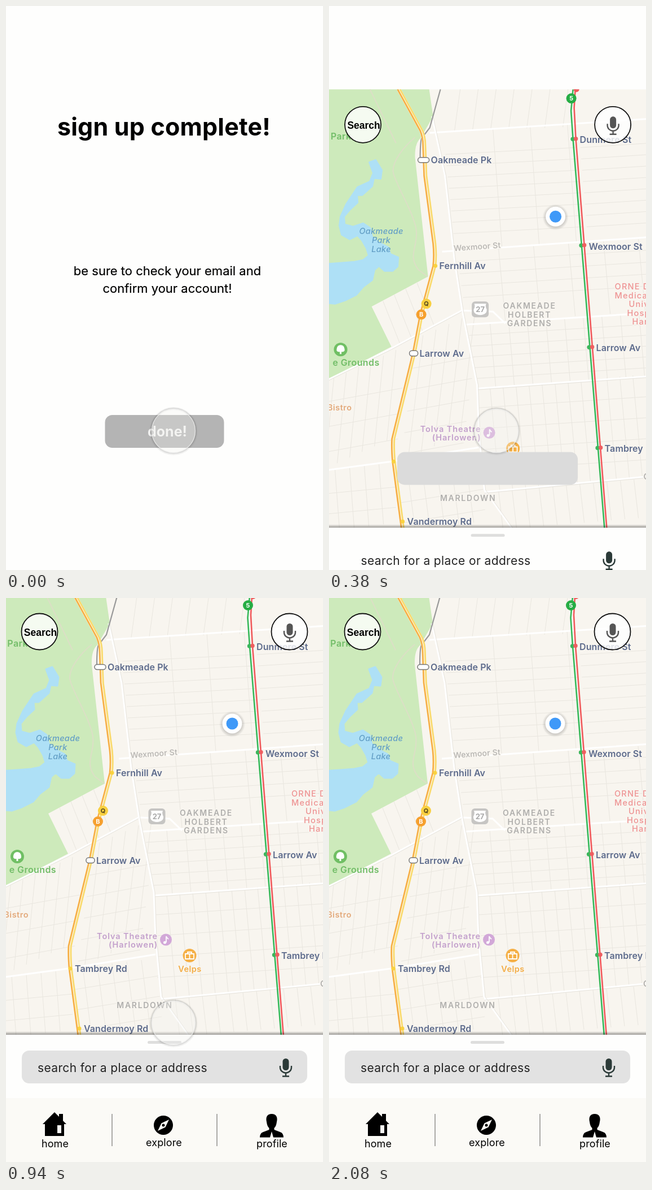
An HTML page that plays this animation: 562 px wide and 997 px high, repeating every 2.1 s.

```html
<!DOCTYPE html>
<html lang="en">
<head>
<meta charset="utf-8">
<title>Sign up to map</title>
<style>
html, body { margin: 0; width: 100%; height: 100%; overflow: hidden; background: #fefefd; }
svg { display: block; width: 562px; height: 997px; font-family: Inter, Roboto, sans-serif; }
.mid { text-anchor: middle; }
.end { text-anchor: end; }
.title { font-weight: 700; font-size: 43px; letter-spacing: .2px; }
.body { font-weight: 400; font-size: 22px; stroke: #000; stroke-width: .2px; }
.done { font-weight: 700; font-size: 25px; fill: #f3f3f2; }
.field { font-size: 21px; letter-spacing: .37px; fill: #222; }
.tab { font-size: 18px; letter-spacing: .1px; }
.search { font: 700 17.5px "Liberation Sans", Arial, sans-serif; }
#labels text { font-weight: 600; font-size: 14.5px; paint-order: stroke; stroke: #f8f5ef; stroke-width: 3px; stroke-linejoin: round; }
#labels .stop { font-size: 16px; letter-spacing: .1px; fill: #5d6b8c; }
#labels .street { font-size: 14px; font-weight: 500; fill: #b5b3b0; letter-spacing: .2px; }
#labels .area { font-size: 14px; fill: #b0afad; letter-spacing: 1.7px; }
#labels .clinic { font-weight: 500; fill: #ee9393; letter-spacing: 1.2px; }
#labels .stage { fill: #c3a0cc; letter-spacing: .9px; }
#labels .shop { fill: #f3ad47; letter-spacing: .5px; }
#labels .food { fill: #e3aa7c; letter-spacing: .5px; }
#labels .park { font-size: 16px; fill: #72bd68; stroke: none; letter-spacing: .4px; }
#labels .lake { font-style: italic; font-weight: 500; fill: #639fc6; stroke: none; letter-spacing: .3px; }
.bullet { font-size: 11px; font-weight: 700; text-anchor: middle; }
</style>
</head>
<body>
<svg viewBox="0 0 562 997" xmlns="http://www.w3.org/2000/svg">
  <defs>
    <linearGradient id="edge" x2="0" y2="1">
      <stop offset="0" stop-opacity="0"/><stop offset="1" stop-opacity=".38"/>
    </linearGradient>
    <radialGradient id="halo">
      <stop offset=".7" stop-opacity=".2"/><stop offset="1" stop-opacity="0"/>
    </radialGradient>
    <clipPath id="page"><rect x="-10" y="-3" width="590" height="1010"/></clipPath>
    <g id="mic">
      <rect x="-5.5" y="-16" width="11" height="21" rx="5.5" fill="currentColor"/>
      <path d="M-10-3V0A10 9.5 0 0 0 10 0V-3M0 10V15M-6 15.5H6" fill="none" stroke="currentColor" stroke-width="2.4"/>
    </g>
    <path id="line" d="M123-3L163 70Q168 82 168 95L170 150L186 270Q188 290 186 309L163 395L150 463L113 615Q112 630 114 655L130 775"/>
  </defs>

  <rect width="562" height="997" fill="#fefefd"/>
  <g class="intro">
    <text class="title mid" x="280" y="229">sign up complete!</text>
    <text class="body mid" x="286" y="476">be sure to check your email and</text>
    <text class="body mid" x="286" y="507">confirm your account!</text>
  </g>

  <g class="sheet" clip-path="url(#page)">
    <rect x="-10" y="-3" width="580" height="780" fill="#f8f5ef"/>
    <path fill="#cdeabb" d="M-10-3H177L184 45L162 83Q151 92 152 118L175 328L75 381L110 452L-10 514Z"/>
    <path fill="none" stroke="#dcdfc6" stroke-width="2" d="M72-3L118 92M152 82C130 100 112 125 113 142S150 215 154 245S138 290 158 316L174 328"/>
    <path fill="#aee0f6" stroke="#aee0f6" stroke-width="3" stroke-linejoin="round" d="M71 126L82 122L93 140L91 155L79 154L76 168L58 184L49 184L50 197L36 210L26 222L27 236L42 240L60 234L72 242L76 258L88 268L104 276L108 288L122 294L121 310L112 318L98 318L88 309L80 316L76 334L60 346L48 360L28 370L10 376L-10 374V306L20 304L45 302L60 299L70 291L66 278L58 264L50 255L36 262L22 254L18 238L20 222L30 200L42 182L50 170L72 160L78 145Z"/>
    <path id="lanes" fill="none" stroke="#e9e6df"/>
    <g fill="none" stroke="#fff" stroke-width="3">
      <path d="M182 45L205 150L222 300L236 390L262 520L265 600L275 705L325 775"/>
      <path d="M-10 514L110 455L235 388L290 390L312 411M240 413L570 392"/>
      <path d="M178 74L570 49M200 284L570 258M262 526L570 504M-10 671L110 655L265 630M275 709L570 681"/>
    </g>
    <path fill="none" stroke="#e6e3dc" d="M184 45L207 150L224 300L238 390L264 520L267 600L277 705L327 775M-10 516L110 457L235 390M264 528L570 506M275 711L570 683"/>
    <path fill="none" stroke="#999" stroke-width="2.2" d="M197-3L178 65L164 83Q161 88 161 120"/>
    <use href="#line" fill="none" stroke="#fdf1cd" stroke-width="7"/>
    <use href="#line" fill="none" stroke="#f9da6c" stroke-width="2.6" x="2.4"/>
    <use href="#line" fill="none" stroke="#f6ad45" stroke-width="2.6" x="-2"/>
    <g fill="none" stroke-width="2.6">
      <path stroke="#f1595b" d="M436-3L434 30L437 85L492 775"/>
      <path stroke="#35b95a" d="M432-3L428.500 35L432 85L488 775"/>
    </g>
    <circle cx="438" cy="-3" r="5" fill="#ee5a5c"/>
    <g id="stops"></g>
    <g fill="#fff" stroke="#777" stroke-width="1.5">
      <rect x="157" y="117.500" width="20" height="9" rx="4.500"/>
      <rect x="142" y="459" width="15" height="9.500" rx="4.500"/>
    </g>
    <g fill="#f9d240"><circle cx="188" cy="309" r="3.500"/><circle cx="114" cy="655" r="3.500"/><circle cx="130" cy="761" r="3.500"/></g>

    <rect x="252.500" y="372" width="30" height="28" rx="6" fill="#c6c5c3"/>
    <path d="M257 376H278Q276 381 279 386Q280 395 267.500 396Q255 395 256 386Q259 381 257 376Z" fill="#fff"/>
    <text class="bullet" x="267.500" y="391" style="font-size:13px" fill="#aaa">27</text>
    <g id="labels"></g>
    <g class="bullet">
      <circle cx="172" cy="376" r="9" fill="#f9d040"/><text x="172" y="380" fill="#554820">Q</text>
      <circle cx="163" cy="395" r="9" fill="#f6a02f"/><text x="163" y="399" fill="#fff">B</text>
      <circle cx="429" cy="13" r="9" fill="#26ad44"/><text x="429" y="17" fill="#fff">5</text>
    </g>
    <circle cx="20" cy="457" r="12" fill="#70bf64"/>
    <path d="M18.500 465V461Q12 462 13 456Q14 449 20 449Q26 449 27 456Q28 462 21.500 461V465Z" fill="#fff"/>
    <circle cx="283.500" cy="604" r="10.500" fill="#d2a8d8"/>
    <path d="M284 609V598Q285 601 288 603" fill="none" stroke="#fff" stroke-width="1.800"/><circle cx="281.500" cy="609" r="2.500" fill="#fff"/>
    <circle cx="325.500" cy="632" r="12" fill="#f5b047"/>
    <path d="M318 629H333V638H318ZM322 629V626H329V629M325.500 629V638" fill="none" stroke="#fff" stroke-width="1.800"/>
    <circle cx="401" cy="223" r="23" fill="url(#halo)"/>
    <circle cx="401" cy="222" r="17.500" fill="#fff"/>
    <circle cx="401" cy="222" r="10.500" fill="#3f99f8"/>

    <g fill="#fff" fill-opacity=".8" stroke="#111" stroke-width="1.800">
      <circle cx="59.500" cy="59.500" r="32"/><circle cx="502.500" cy="59.500" r="32"/>
    </g>
    <text class="search mid" x="61" y="66.500">Search</text>
    <use href="#mic" x="503" y="61" color="#555"/>

    <rect x="-10" y="766" width="580" height="6" fill="url(#edge)"/>
    <rect x="-10" y="772" width="580" height="230" fill="#fefefd"/>
    <rect x="251" y="783" width="60" height="5" rx="2.500" fill="#dededd"/>
    <rect x="-10" y="884" width="580" height="120" fill="#fbfaf6"/>
    <path d="M188 912V969M374 912V969" stroke="#aaa9a7" stroke-width="2"/>
    <path d="M65 930L86 909L94 917V912H101V924L107 930H103V951H69V930Z"/>
    <rect x="91" y="932" width="7" height="14" fill="#fbfaf6"/>
    <circle cx="279" cy="932" r="17"/>
    <path d="M289 922L282.500 935.500L269 942L275.500 928.500Z" fill="#fbfaf6"/><circle cx="279" cy="932" r="2.500"/>
    <path d="M471 912C479 912 482 918 480 926Q479 934 475.500 937V940L486 944Q492 946 492 953.500H474L471 943L468 953.500H450Q450 946 456 944L466.500 940V937Q463 934 462 926C460 918 463 912 471 912Z"/>
    <g class="tab mid">
      <text x="87" y="971">home</text><text x="280" y="969">explore</text><text x="471.500" y="971">profile</text>
    </g>
  </g>

  <rect id="box" height="58" rx="13"/>
  <text class="done mid intro" x="286" y="761">done!</text>
  <g class="sheet">
    <text class="field" x="56" y="838">search for a place or address</text>
    <use href="#mic" x="496" y="830" color="#2b3a38"/>
  </g>

  <g id="touch" fill="none" stroke="#000">
    <circle cx="297" cy="751.500" r="40" stroke-opacity=".05" stroke-width="5"/>
    <circle cx="297" cy="751" r="39.500" stroke-opacity=".1" stroke-width="2.500"/>
    <circle cx="297" cy="751" r="38.500" fill="#f0f0ef" fill-opacity=".3" stroke="#f4f4f3" stroke-opacity=".75" stroke-width="1.500"/>
  </g>
</svg>

<script>
const LOOP = 2100;
const $ = id => document.getElementById(id);

// n parallel lines, each shifted by (dx, dy)
const hatch = (x1, y1, x2, y2, dx, dy, n) =>
  Array.from({ length: n }, (_, i) =>
    `M${x1 + dx * i} ${y1 + dy * i}L${x2 + dx * i} ${y2 + dy * i}`).join("");

$("lanes").setAttribute("d", [
  [206, 112, 436, 100, 2, 20, 8], [445, 100, 570, 92, 1.6, 20, 8],
  [222, 70, 232, -3, 32, -1, 7], [290, 66, 306, 275, 66, -4, 3],
  [228, 302, 570, 281, 3, 21, 4], [300, 278, 312, 406, 62, -4, 5],
  [248, 432, 570, 412, 3.5, 19, 5], [285, 411, 295, 523, 33, -2.2, 9],
  [265, 560, 570, 540, 1, 37, 4], [285, 525, 302, 706, 23, -2, 12],
  [300, 707, 308, 775, 24, -2, 11],
  [8, 508, -8, 668, 22, -10, 6], [166, 432, 140, 648, 23, -10, 5],
  [148, 490, 258, 470, -5, 38, 5], [-8, 550, 130, 525, -4, 45, 3],
  [10, 669, 18, 775, 26, -3, 4], [136, 652, 152, 775, 26, -3, 5],
  [-8, 712, 118, 700, 0, 36, 2], [122, 692, 270, 668, 3, 36, 3],
  [95, 371, 125, 446, 20, -11, 4]
].map(h => hatch(...h)).join(""));

$("stops").innerHTML = [[434.5, 85], [449.5, 273], [463.5, 453], [478.5, 631]].map(([x, y]) =>
  `<circle cx="${x - 3}" cy="${y}" r="3.7" fill="#3cb65c"/><circle cx="${x + 2.5}" cy="${y - .5}" r="3.7" fill="#ee5f61"/>`).join("");

$("labels").innerHTML = [
  ["stop", 180, 128, "Oakmeade Pk"], ["stop", 195, 315, "Fernhill Av"],
  ["stop", 160, 470, "Larrow Av"], ["stop", 122, 661, "Tambrey Rd"],
  ["stop", 138, 767, "Vandermoy Rd"], ["stop", 444, 92, "Dunmere St"],
  ["stop", 460, 281, "Wexmoor St"], ["stop", 473, 460, "Larrow Av"],
  ["stop", 488, 638, "Tambrey R"],
  ["lake mid", 92, 253, "Oakmeade"], ["lake mid", 92, 269, "Park"], ["lake mid", 92, 285, "Lake"],
  ["area mid", 355, 385, "OAKMEADE"], ["area mid", 355, 400.5, "HOLBERT"], ["area mid", 355, 416, "GARDENS"],
  ["area mid", 246, 725, "MARLDOWN"],
  ["clinic", 506, 351, "ORNE D"], ["clinic", 506, 367, "Medica"], ["clinic", 531, 382, "Univ"],
  ["clinic", 528, 398, "Hosp"], ["clinic", 537, 413, "Har"],
  ["stage end", 269, 603, "Tolva Theatre"], ["stage end", 269, 618, "(Harlowen)"],
  ["shop mid", 326, 661, "Velps"], ["food end", 40, 565, "Bistro"],
  ["park end", 39, 86, "Park"], ["park end", 89, 486, "e Grounds"],
  ["area", 557, 687, "C"]
].map(([c, x, y, s]) => `<text class="${c}" x="${x}" y="${y}">${s}</text>`).join("") +
  `<text class="street" transform="translate(221 283) rotate(-4)">Wexmoor St</text>`;

const clamp = v => Math.min(1, Math.max(0, v));
const span = (t, from, to) => clamp((t - from) / (to - from));
const inOut = (u, n) => u < .5 ? (2 * u) ** n / 2 : 1 - (2 - 2 * u) ** n / 2;
const mix = (a, b, k) => a + (b - a) * k;

const sheets = document.querySelectorAll(".sheet");
const intros = document.querySelectorAll(".intro");
const box = $("box"), touch = $("touch");

function draw(t) {
  const rise = inOut(span(t, -62, 668), 5);
  const grow = inOut(span(t, 172, 658), 2);
  const left = 1 - rise;
  sheets.forEach(s => s.setAttribute("transform", `translate(${4 * left} ${1000 * left})`));
  intros.forEach(e => e.setAttribute("opacity", 1 - span(t, 70, 215)));
  box.setAttribute("x", mix(175.5, 28, grow));
  box.setAttribute("width", mix(211, 506, grow));
  box.setAttribute("y", mix(723, 800, rise));
  const grey = Math.round(mix(180, 226, rise));
  box.setAttribute("fill", `rgb(${grey},${grey},${grey})`);
  touch.setAttribute("opacity", 1 - span(t, 960, 1140));
}

const start = performance.now();
function tick() {
  draw((performance.now() - start) % LOOP);
  requestAnimationFrame(tick);
}
tick();
</script>
</body>
</html>
```
